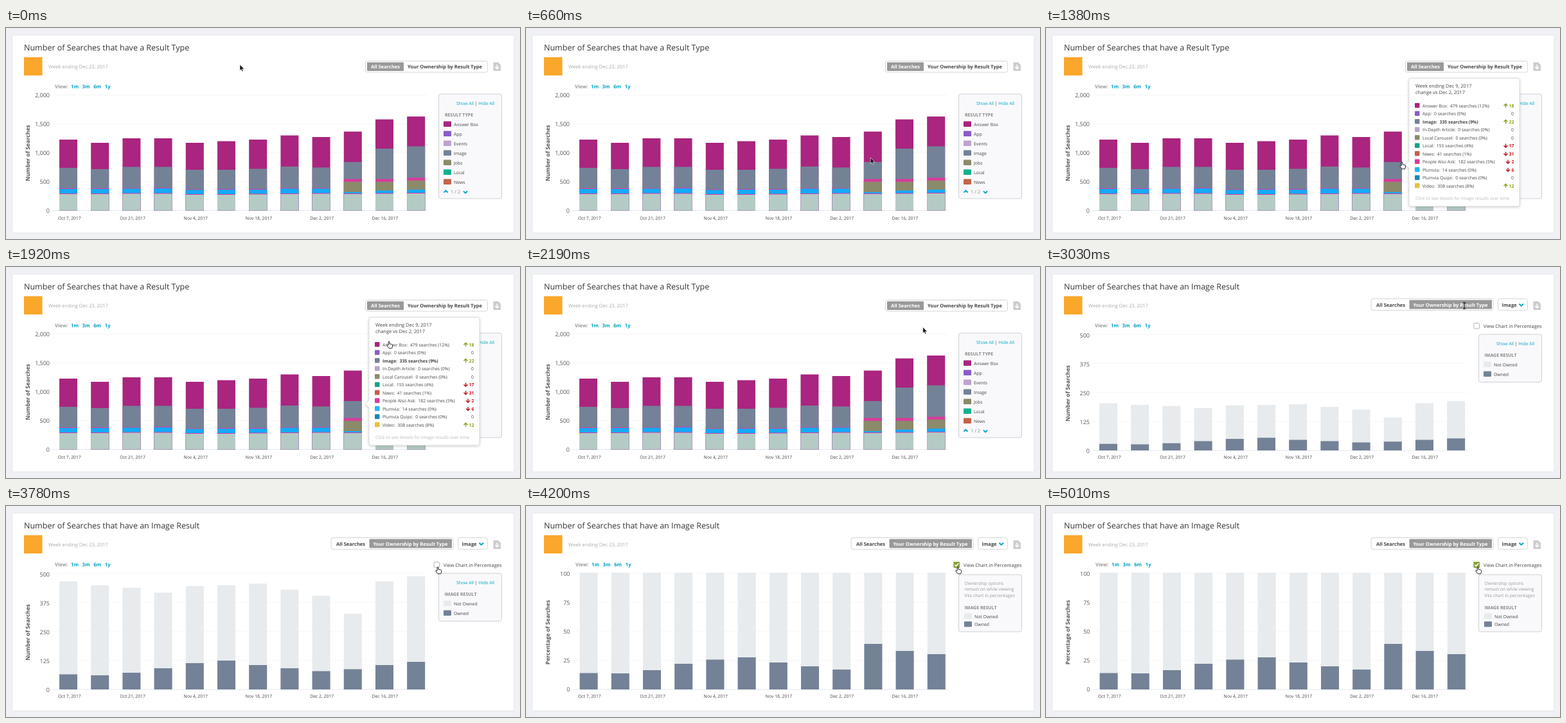
Recreate the animation shown at these times as an HTML page. Size 800 px wide and 329 px high, loop 5.04 s.

```html
<!DOCTYPE html>
<html lang="en">
<head>
<meta charset="utf-8">
<title>Result type chart</title>
<style>
html, body { margin: 0; width: 100%; height: 100%; overflow: hidden; background: #f0f1f5; }
svg { display: block; width: 100%; height: 100%; font-family: "Open Sans", sans-serif; }
text { white-space: pre; text-rendering: geometricPrecision; }
</style>
</head>
<body>
<svg id="stage" viewBox="0 0 800 329"></svg>
<script>
const LOOP = 5040, BASE = 286;
const TOOLTIP_ON = 750, TOOLTIP_OFF = 2070, OWNERSHIP = 2880, PERCENT = 3900;
const TEAL = '#00a5c4', PINK = '#a9257f', SLATE = '#748297', HOT = '#d93a9d', OLIVE = '#8b8a6b',
  BLUE = '#14a9fb', PALE = '#b4cbc5', LIGHT = '#e7ebed', GREEN = '#8aa31c', RED = '#c4161c';
const BOLD = 'font-weight="700"', MID = 'text-anchor="middle"', END = 'text-anchor="end"';

// Markup helpers
const text = (x, y, s, size = 6.85, fill = '#444', extra = '') =>
  `<text x="${x}" y="${y}" font-size="${size}" fill="${fill}" ${extra}>${s}</text>`;
const rect = (x, y, w, h, fill, r = 0, extra = '') =>
  `<rect x="${x}" y="${y}" width="${w}" height="${h}" rx="${r}" fill="${fill}" ${extra}/>`;
const line = (d, color, width = 1.8) =>
  `<path d="${d}" fill="none" stroke="${color}" stroke-width="${width}"/>`;
const box = (x, y, w, h, fill = '#fff', stroke = '#d4d6d9', r = 3) =>
  rect(x, y, w, h, fill, r, `stroke="${stroke}"`);
const group = (id, ...parts) => `<g id="${id}">${parts.join('')}</g>`;
const bars = (tops, base, dx = 0) =>
  tops.map((y, i) => `M${83 + dx + 49.2 * i} ${y}h28V${base}h-28z`).join('');
const layer = (color, tops) => `<path fill="${color}" d="${bars(tops, 284.5)}"/>`;

const grid = (y, step) => [0, 1, 2, 3, 4].map(i => line(`M72 ${y + i * step}H657`, i < 4 ? '#f4f4f5' : '#dde3ea', .8)).join('');
const ticks = (labels, y, step, x = 68) =>
  labels.map((s, i) => text(x, y + i * step, s, 9, '#555', END)).join('');
const axisTitle = (s, y) => text(0, 0, s, 8.7, '#555', `${BOLD} ${MID} transform="translate(37 ${y}) rotate(-90)"`);
const viewLinks = x => text(x, 93.5, 'View:', 7.7, '#999', BOLD) +
  ['1m', '3m', '6m', '1y'].map((s, i) => text(x + 25 + i * 17.6, 93.5, s, 7.7, TEAL, BOLD)).join('');
const legendLinks = y => text(701, y, `<tspan fill="${TEAL}">Show All</tspan> | <tspan fill="${TEAL}">Hide All</tspan>`, 6.9);
const legendRows = (rows, y, x = 681) => rows.map(([name, color], i) =>
  rect(x, y + i * 15 - 4.5, 12, 8.5, color, 1) + text(x + 16, y + i * 15 + 2.5, name, 6.9)).join('');

// Overview: each layer runs from its tops down to the axis
const slateEnds = [250, 250, 249.5, 249, 251.5, 251, 251, 249.5, 249.5, 235.5, 235.5, 233.5];
const paleTops = [259, 259, 258.5, 258.5, 260, 260, 259.5, 259, 258.5, 259, 258.5, 258];
const overviewBars = [
  layer(PINK, [174, 179, 172, 172, 179, 176.5, 174, 167.5, 170, 161.5, 142.5, 138]),
  layer(SLATE, [218, 220, 216.5, 216.5, 221, 221, 219.5, 216, 217.5, 209, 188, 184.5]),
  layer(HOT, slateEnds),
  layer(OLIVE, slateEnds.map((y, i) => y + (i < 9 ? 1 : 4.3))),
  layer(BLUE, slateEnds.map((y, i) => i < 9 ? y + 1 : [256, 253.5, 252][i - 9])),
  layer(HOT, paleTops.map(y => y - 1)),
  layer(PALE, paleTops)
].join('');

// Ownership: tops by count and by percentage
const totalTops = [117.5, 123.5, 127.5, 135, 125, 123.5, 121, 130.5, 140, 168, 117.5, 109.5];
const ownedTops = [262.5, 264, 260, 253, 245, 241, 248, 253, 257.5, 254.5, 248, 243];
const ownedShare = [260.5, 261, 256, 246, 239.5, 236, 244, 250, 255, 215, 226, 231];

const tipRows = [
  ['Answer Box', '479', 12, PINK, 18], ['App', '0', 0, '#8a5cc8', 0], ['Image', '335', 9, SLATE, 22],
  ['In-Depth Article', '0', 0, '#b7a5c8', 0], ['Local Carousel', '0', 0, OLIVE, 0],
  ['Local', '155', 4, '#16a388', -17], ['News', '41', 1, '#c0614a', -31],
  ['People Also Ask', '182', 5, HOT, -2], ['Plumvia', '14', 0, '#25b4fa', -6],
  ['Plumvia Quips', '0', 0, '#1c86b8', 0], ['Video', '308', 8, '#e2c23f', 12]
];
const tipRow = ([name, count, share, color, change], i) => {
  const y = 121 + i * 12.5, tone = change > 0 ? GREEN : RED, s = Math.sign(change);
  const ax = Math.abs(change) < 10 ? 719 : 715.5;
  return rect(574, y - 4, 7.5, 7.5, color, 1) +
    text(586, y + 2.5, `${name}:  ${count} searches (${share}%)`, 6.85, '#444', name === 'Image' ? BOLD : '') +
    (change
      ? line(`M${ax} ${y + 3 * s}V${y - 2.5 * s}M${ax - 3} ${y + .3 * s}l3 ${-3 * s} 3 ${3 * s}`, tone, 1.5) +
        text(728.5, y + 2.5, Math.abs(change), 7, tone, `${BOLD} ${END}`)
      : text(728, y + 2.5, 0, 6.85, '#444', END));
};

const dates = ['Oct 7', 'Oct 21', 'Nov 4', 'Nov 18', 'Dec 2', 'Dec 16'];
const $ = id => document.getElementById(id);
$('stage').innerHTML = [
  rect(0, 0, 800, 329, '#f0f1f5'),
  box(9.5, 11, 781.5, 308.5, '#fff', '#e3e5e9', 1),
  rect(28, 45.5, 28.5, 28.5, '#fba729'),
  text(66, 62.5, 'Week ending Dec 23, 2017', 7.6, '#aaa'),
  '<path d="M758.5 53.5h7.5l4 4v9.5h-11.500z" fill="#ccc"/>',
  line('M764.3 57v6.500M761.300 60.700l3 3 3-3', '#fff', 1.5),
  dates.map((d, i) => text(98.9 + 98.2 * i, 298.5, d + ', 2017', 6.85, '#444', MID)).join(''),
  group('overview',
    text(28, 35, 'Number of Searches that have a Result Type', 12.5, '#333'),
    box(559.5, 51.5, 190, 17.5), rect(562, 53.5, 57, 13.5, '#999', 1),
    text(568, 63, 'All Searches', 7.5, '#fff', BOLD),
    text(625, 63, 'Your Ownership by Result Type', 7.5, '#444', BOLD),
    viewLinks(76), grid(104.5, 45), ticks(['2,000', '1,500', '1,000', '500', '0'], 108, 45),
    axisTitle('Number of Searches', 195), overviewBars,
    box(673.5, 103, 98, 163, '#f9f9fb', '#cdd0d6'), legendLinks(119.5),
    text(683, 138, 'RESULT TYPE', 7, '#888', BOLD),
    legendRows([['Answer Box', PINK], ['App', '#8a5cc8'], ['Events', '#c0a2d2'], ['Image', SLATE],
      ['Jobs', OLIVE], ['Local', '#16b08e'], ['News', '#c4634b']], 150),
    line('M681.500 256.500l3-3 3 3M712 254.500l3 3 3-3', TEAL, 1.9),
    text(692, 257.500, '1 / 2', 7.4, '#888')),
  group('tooltip',
    '<path d="M568 78.500H734q3 0 3 3V275q0 3-3 3H568q-3 0-3-3V219l-6-5.500 6-5.500V81.500q0-3 3-3z" fill="#fff" stroke="#d9dadd" stroke-width=".8" style="filter:drop-shadow(0 1px 2px #0003)"/>',
    text(575, 92.500, 'Week ending Dec 9, 2017', 7.5), text(575, 103, 'change vs Dec 2, 2017', 7.5),
    tipRows.map(tipRow).join(''),
    text(575, 267.500, 'Click to see details for Image results over time', 6.85, '#bbb')),
  group('ownership',
    text(28, 35, 'Number of Searches that have an Image Result', 12.5, '#333'),
    box(506, 49.5, 190, 18), rect(565.5, 51.5, 128.5, 14, '#999', 1),
    text(514, 61.500, 'All Searches', 7.5, '#444', BOLD),
    text(571.500, 61.500, 'Your Ownership by Result Type', 7.5, '#fff', BOLD),
    box(703.500, 49.500, 46, 18), text(709.500, 61.500, 'Image', 7.5, '#444', BOLD),
    line('M736.500 57.500l3.200 3.200 3.200-3.200', TEAL, 2),
    text(681, 94.500, 'View Chart in Percentages', 7.5),
    grid(105, 45.3),
    `<path id="total" fill="${LIGHT}"/><path id="owned" fill="${SLATE}"/>`,
    group('counts', viewLinks(76), axisTitle('Number of Searches', 197),
      ticks([500, 375, 250, 125, 0], 110, 45.1), box(666, 87.500, 8.500, 8.500, '#fff', '#b5b5b5', 1),
      box(673.500, 105, 98, 74.500, '#f9f9fb', '#cdd0d6'), legendLinks(121.500),
      text(682.500, 140, 'IMAGE RESULT', 7, '#888', BOLD),
      legendRows([['Not Owned', LIGHT], ['Owned', SLATE]], 152)),
    group('percent', viewLinks(77), axisTitle('Percentage of Searches', 197),
      ticks([100, 75, 50, 25, 0], 109, 45.1, 68.5), rect(665.500, 87, 9.500, 9.500, '#85a13d', 1),
      line('M667.500 91.500l2 2.300 3.700-4.600', '#fff', 1.5),
      box(673.500, 107, 98, 89, '#f9f9fb', '#cdd0d6'),
      ['Ownership options', 'remain on while viewing', 'this chart in percentages'].map((s, i) => text(682.500, 123 + 9.4 * i, s, 6.85, '#999')).join(''),
      text(682.500, 160.500, 'IMAGE RESULT', 7, '#888', BOLD),
      legendRows([['Not Owned', LIGHT], ['Owned', SLATE]], 172, 682)
        .replace(/(y=")(187|184\.5|182\.5|189\.5)/g, (_, a, n) => a + (n - 2.500)))),
  group('cursor',
    '<path id="arrow" d="M0 0V9.500l2.100-2 1.500 3.300 1.600-.7-1.500-3.200h2.900z" fill="#111" stroke="#fff" stroke-width=".6"/>',
    '<path id="hand" d="M-.9 6V.9a.9.9 0 0 1 1.800 0V3.800l3.700.7q1.200.3 1.100 1.600l-.4 2.700-.7 2H.1L-3 6.800q-.4-1.300.8-1.300z" fill="#fff" stroke="#111" stroke-width=".9"/>',
    group('beam', line('M-2-5q2 0 2 1.200V3.800q0 1.200 2 1.200M2-5q-2 0-2 1.200V3.800q0 1.200-2 1.200', '#111', 1.1)))
].join('');

// Motion
const track = [[60, 364, 57], [640, 536, 202], [1000, 554, 209], [1440, 554, 209],
  [1920, 596, 116], [2550, 651, 60], [3000, 651, 60], [3540, 672, 95]];
const ease = (t, from, to) => {
  const k = Math.min(1, Math.max(0, (t - from) / (to - from)));
  return k * k * (3 - 2 * k);
};
const mix = (a, b, k) => a + (b - a) * k;
const pointer = t => {
  let [, x, y] = track[0];
  for (let i = 1; i < track.length; i++) {
    const k = ease(t, track[i - 1][0], track[i][0]);
    x = mix(x, track[i][1], k);
    y = mix(y, track[i][2], k);
  }
  return [x, y];
};
const show = (id, on) => $(id).style.display = on ? '' : 'none';

function draw(t) {
  const owning = t >= OWNERSHIP, share = t >= PERCENT, tip = t >= TOOLTIP_ON && t < TOOLTIP_OFF;
  show('overview', !owning);
  show('ownership', owning);
  show('tooltip', tip);
  show('counts', !share);
  show('percent', share);

  const grow = ease(t, OWNERSHIP, OWNERSHIP + 330), turn = ease(t, PERCENT, PERCENT + 300);
  const morph = (count, percent) => mix(mix(BASE, count, grow), percent, turn);
  $('total').setAttribute('d', bars(totalTops.map(y => morph(y, 104)), BASE, .6 * turn));
  $('owned').setAttribute('d', bars(ownedTops.map((y, i) => morph(y, ownedShare[i])), BASE, .6 * turn));

  const hand = tip || t >= 3450, beam = t >= 2460 && t < 3060;
  show('hand', hand);
  show('beam', beam);
  show('arrow', !hand && !beam);
  $('cursor').setAttribute('transform', `translate(${pointer(t)})`);
}

function tick() {
  draw(performance.now() % LOOP);
  requestAnimationFrame(tick);
}
tick();
</script>
</body>
</html>
```
